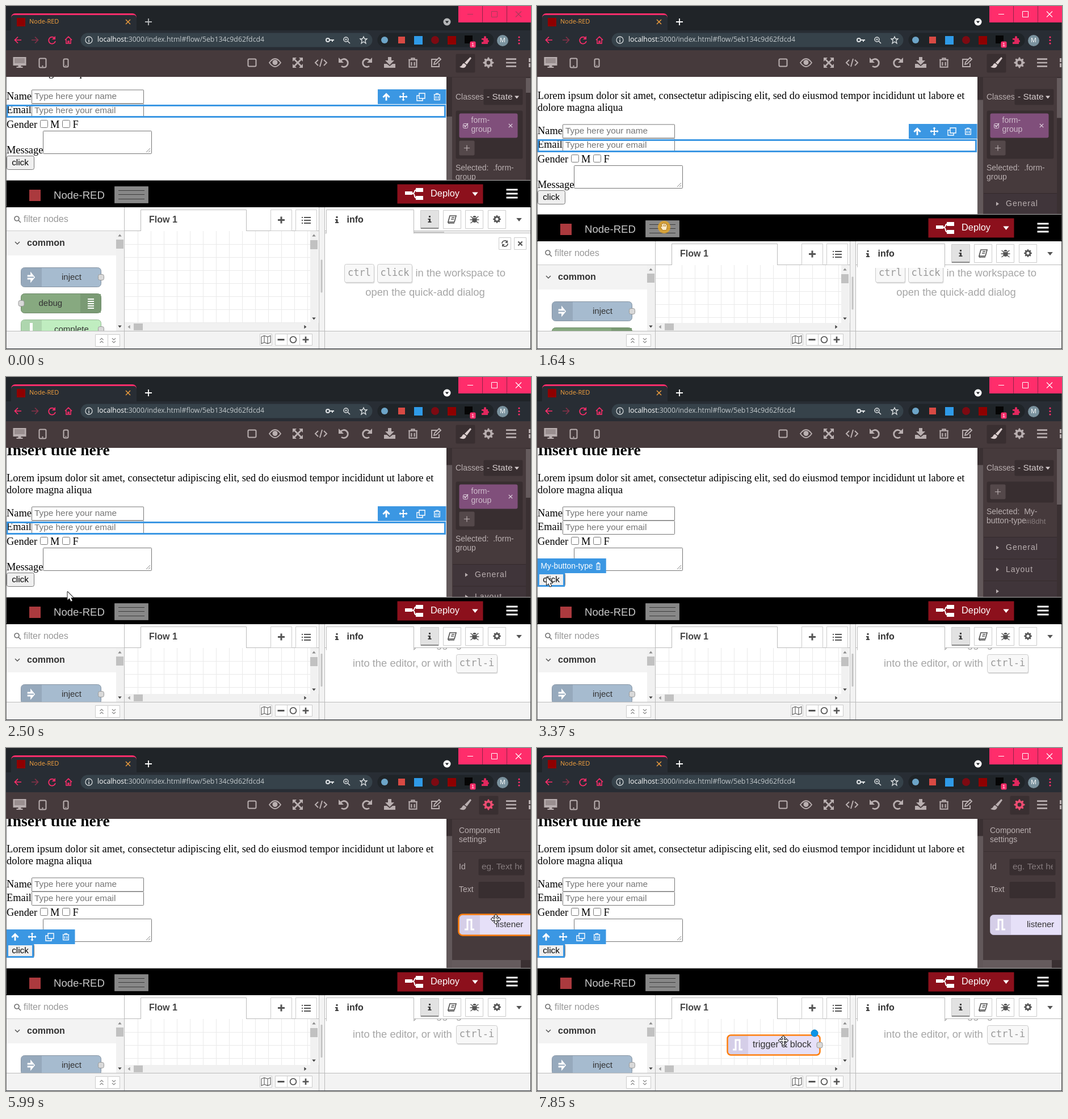
Animation of 925 by 605 pixels, one loop 8 s. Source, as an HTML page with a canvas:

```html
<!DOCTYPE html>
<html lang="en">
<head>
<meta charset="utf-8">
<title>Flow editor</title>
<style>
html, body { margin: 0; width: 100%; height: 100%; overflow: hidden; background: #fff; }
canvas { display: block; }
</style>
</head>
<body>
<canvas id="stage" width="925" height="605"></canvas>
<script>
const ctx = document.getElementById('stage').getContext('2d');
const SANS = '"Liberation Sans", Arial, sans-serif';
const SERIF = '"Liberation Serif", "Times New Roman", serif';
const MONO = '"DejaVu Sans Mono", monospace';
const UI = '"Open Sans", sans-serif';
const BLUE = '#3b97e3', PINK = '#ff2d6b', PANEL = '#463a3c', DARK = '#382e30', SOFT = '#b9afb0', ORANGE = '#ff7f0e';
const LOOP = 8000;

// Bursts of change: start, end, number of steps
const bursts = [[290, 470, 3], [610, 1190, 8], [1330, 2040, 10], [2190, 2830, 9], [3220, 3370, 3],
  [3620, 4320, 10], [4630, 5100, 7], [5370, 6140, 11], [6220, 6980, 11], [7060, 7850, 11]];
const mousePath = [[290, 742, 568], [380, 400, 450], [470, 42, 348], [610, 60, 350], [900, 160, 345],
  [1190, 229, 327], [1330, 229, 327], [1488, 227, 356], [1645, 224, 389], [1960, 219, 407], [2040, 217, 410],
  [2190, 200, 405], [2830, 17, 353], [3370, 17, 353], [3620, 60, 350], [4000, 600, 212], [4320, 885, 267],
  [4630, 885, 262], [5100, 864, 119], [5370, 850, 100], [5530, 850, 100], [5980, 863, 302], [6140, 863, 302],
  [6220, 845, 290], [6500, 600, 220], [6760, 480, 350], [6980, 410, 489], [7060, 412, 492], [7850, 434, 516]];
const splitPath = [[1330, 0], [1409, 10], [1488, 28], [1566, 46], [1645, 60.5], [1960, 78.5], [2040, 80], [2190, 81]];

function snap(t) {
  let s = 0;
  for (const [a, b, n] of bursts) {
    if (t < a) break;
    const k = Math.min(n - 1, Math.floor((t - a) * (n - 1) / (b - a) + 0.15));
    s = a + k * (b - a) / (n - 1);
  }
  return s;
}
function along(keys, t, i = 1) {
  if (t <= keys[0][0]) return keys[0][i];
  for (let k = 1; k < keys.length; k++) {
    const a = keys[k - 1], b = keys[k];
    if (t < b[0]) return a[i] + (b[i] - a[i]) * (t - a[0]) / (b[0] - a[0]);
  }
  return keys[keys.length - 1][i];
}

function rect(x, y, w, h, c) { ctx.fillStyle = c; ctx.fillRect(x, y, w, h); }
function box(x, y, w, h, fill, stroke, r = 0, lw = 1) {
  ctx.beginPath();
  ctx.roundRect(x + .5, y + .5, w - 1, h - 1, r);
  if (fill) { ctx.fillStyle = fill; ctx.fill(); }
  if (stroke) { ctx.strokeStyle = stroke; ctx.lineWidth = lw; ctx.stroke(); }
}
function disc(x, y, r, fill) {
  ctx.beginPath(); ctx.arc(x, y, r, 0, 7); ctx.fillStyle = fill; ctx.fill();
}
function text(s, x, y, size, color, { font = SANS, bold, align = 'left', gap = 0 } = {}) {
  ctx.font = `${bold ? 'bold ' : ''}${size}px ${font}`;
  ctx.textAlign = align;
  ctx.textBaseline = 'middle';
  ctx.letterSpacing = gap + 'px';
  ctx.fillStyle = color;
  ctx.fillText(s, x, y);
}
// Filled when w is 0, stroked otherwise
function icon(d, x, y, c, w = 0, sx = 1, sy = sx) {
  ctx.save();
  ctx.translate(x, y);
  ctx.scale(sx, sy);
  const p = new Path2D(d);
  if (w) { ctx.strokeStyle = c; ctx.lineWidth = w; ctx.stroke(p); }
  else { ctx.fillStyle = c; ctx.fill(p, 'evenodd'); }
  ctx.restore();
}
function clip(x, y, w, h, draw) {
  ctx.save();
  ctx.beginPath(); ctx.rect(x, y, w, h); ctx.clip();
  draw();
  ctx.restore();
}

const ring = 'M6 0A6 6 0 1 1-6 0A6 6 0 1 1 6 0';
const cross = 'M-4-4L4 4M4-4L-4 4', plus = 'M-6 0H6M0-6V6', down = 'M-4-2H4L0 3Z', up = 'M-4 2H4L0-3Z', right = 'M-2-4V4L3 0Z';
const turn = 'M-5-4A7 7 0 1 1-4 6', turnTip = 'M-9-9V0H0Z';
const bin = 'M-6-4H6M-2-4V-6H2V-4M-5-4V6H5V-4M-2-1V4M2-1V4';
const copy = 'M-3-6H7V3H-3ZM-3-2H-7V7H3V3';
const moveArrows = 'M0-8L3-5H1V-1H5V-3L8 0L5 3V1H1V5H3L0 8L-3 5H-1V1H-5V3L-8 0L-5-3V-1H-1V-5H-3Z';
const arrowUp = 'M0-7L7 0L5 2L1.5-1V7H-1.5V-1L-5 2L-7 0Z';
const pencil = 'M4-6H-7V7H6V1M-3 3L-2-1L6-9L9-6L1 2Z';
const lens = 'M3-1A4 4 0 1 1-5-1A4 4 0 1 1 3-1M2 2L6 6';
const bars = 'M-10-7H10M-10 0H10M-10 7H10';
const list = 'M-8-5H-6M-4-5H8M-8 0H-6M-4 0H8M-8 5H-6M-4 5H8';
const pulse = 'M-8 8H-3V-9H4V8H9';
const triangleSide = 'M-2-3.5V3.5L3 0Z';

function gear(x, y, r, c) {
  let d = '';
  for (let i = 0; i < 32; i++) {
    const a = (i - .5) * Math.PI / 16, q = i % 4 < 2 ? r : r * .75;
    d += (i ? 'L' : 'M') + q * Math.cos(a) + ' ' + q * Math.sin(a);
  }
  const h = r * .36;
  icon(`${d}ZM${h} 0A${h} ${h} 0 1 0 ${-h} 0A${h} ${h} 0 1 0 ${h} 0Z`, x, y, c);
}

function browser(active) {
  rect(0, 0, 925, 44, '#202428');
  ctx.beginPath(); ctx.roundRect(9, 13, 221, 32, [7, 7, 0, 0]); ctx.fillStyle = PINK; ctx.fill();
  ctx.beginPath(); ctx.roundRect(9, 16, 221, 29, [5, 5, 0, 0]); ctx.fillStyle = '#282d34'; ctx.fill();
  rect(0, 43, 925, 35, '#282d34');
  rect(19, 21, 15, 15, '#8f0000');
  text('Node-RED', 41, 28, 11, '#f5a13d', { font: UI });
  icon(cross, 215, 28, '#f5a13d', 1.4);
  const tone = active ? '#fff' : '#b4b6b8';
  icon(plus, 251, 28, tone, 1.8);
  disc(777, 28, 6.5, tone);
  icon(down, 777, 28, '#202428', 0, .8);
  rect(797, 0, 128, 29, PINK);
  rect(839, 0, 1, 29, '#8e2448');
  rect(882, 0, 1, 29, '#8e2448');
  const glyph = active ? '#fff' : '#a83a5a';
  icon('M-5 0H5', 818, 14.5, glyph, 1);
  box(855, 9, 11, 11, null, glyph);
  icon('M-5-5L5 5M5-5L-5 5', 903, 14.5, glyph, 1.1);

  const back = 'M6 0H-5M0-5.5L-5.5 0L0 5.5';
  icon(back, 21, 60, PINK, 1.7);
  icon(back, 51, 60, '#853249', 1.7, -1, 1);
  icon('M5-3A6 6 0 1 0 6 2', 81, 60, PINK, 1.7);
  icon('M1-1H7V-7Z', 80, 60, PINK);
  icon('M-6 0L0-6L6 0M-4-1V6H-1V2H1V6H4V-1', 110, 60, PINK, 1.5);
  box(131, 47, 515, 26, '#36424a', null, 13);
  icon(ring, 146, 60, '#d4d8da', 1.3);
  rect(145.3, 59, 1.5, 5, '#d4d8da');
  rect(145.3, 56, 1.5, 1.6, '#d4d8da');
  const host = { font: UI };
  text('localhost', 161, 60, 12.3, '#fff', host);
  const w = ctx.measureText('localhost').width;
  text(':3000/index.html#flow/5eb134c9d62fdcd4', 161 + w, 60, 12.3, '#c3c9cc', host);
  icon('M-1 0A3 3 0 1 1-7 0A3 3 0 1 1-1 0M-1 0H7M4 0V3', 571, 60, '#dfe3e5', 2);
  icon(lens, 600, 60, '#dfe3e5', 1.5);
  icon('M-3-1H1M-1-3V1', 600, 60, '#dfe3e5', 1);
  icon('M0-6L1.8-2H6L2.8 1L4 6L0 3L-4 6L-2.8 1L-6-2H-1.8Z', 630, 60, '#dfe3e5', 1.3);
  box(654, 47, 206, 26, '#1f2428', null, 13);
  disc(667, 60, 6, '#6da5c8');
  rect(691, 54, 12, 12, '#d84a44');
  rect(719, 53, 15, 15, '#2f9be8');
  disc(756, 60, 7, '#7d0a12');
  rect(778, 53, 15, 15, '#8f0000');
  rect(808, 52, 14, 14, '#050505');
  box(817, 62, 11, 12, PINK, null, 2);
  text('1', 822.5, 68.5, 9, '#fff', { align: 'center' });
  icon('M-6-3H-2V-5A2 2 0 1 1 2-5V-3H5V0A2 2 0 1 1 5 4V7H-6V3A2 2 0 1 0-6 0Z', 844, 60, '#e0285e');
  disc(875, 61, 10, '#7a929e');
  text('M', 875, 61, 11, '#fff', { font: UI, align: 'center' });
  for (const y of [55, 60.5, 66]) disc(904, y, 1.6, PINK);
}

function toolbar(settings) {
  rect(0, 78, 925, 47, PANEL);
  const c = SOFT;
  icon('M-11-10H12V5H-11ZM-2 5H3V7H6V9H-5V7H-2Z', 23.5, 100, c);
  rect(15, 92, 18, 9, '#9a8f90');
  box(58, 92, 13, 17, null, c, 2, 2); disc(64.5, 106, 1.2, c);
  box(101, 93, 9, 15, null, c, 2, 2); disc(105.5, 105, 1, c);
  box(426, 93, 15, 14, null, c, 2, 2);
  icon('M-10 0Q0-14 10 0Q0 14-10 0Z', 474, 100, c, 1.8);
  disc(474, 99.5, 4.5, c);
  icon('M-9-9H-2L-4.5-6.5L0-2L4.5-6.5L2-9H9V-2L6.5-4.5L2 0L6.5 4.5L9 2V9H2L4.5 6.5L0 2L-4.5 6.5L-2 9H-9V2L-6.5 4.5L-2 0L-6.5-4.5L-9-2Z', 514, 100, c);
  icon('M-5-5L-10 0L-5 5M5-5L10 0L5 5M2-7L-2 7', 555, 100, c, 2);
  for (const [x, s] of [[595, 1], [636, -1]]) {
    icon(turn, x, 100, c, 2.8, s, 1);
    icon(turnTip, x, 100, c, 0, s, 1);
  }
  icon('M-3-10H3V-4H8L0 4L-8-4H-3ZM-10 2H-5L0 6L5 2H10V9H-10Z', 676, 100, c);
  icon(bin, 717, 100, c, 1.6, 1.3);
  icon(pencil, 757, 100, c, 1.9);
  box(settings ? 833 : 792, 84, 35, 34, '#392f31', null, 2);
  icon('M9-10L11-8L3 3L-1 0ZM-2 1L2 4Q1 10-5 9Q-8 9-10 7Q-6 6-5 3Q-4 1-2 1Z', 809, 100, settings ? c : '#dccfcf');
  gear(850, 100, 9.5, settings ? '#ee4d72' : c);
  icon(bars, 890, 100, c, 3, .9);
  rect(921, 92, 4, 7, c); rect(921, 101, 4, 7, c);
}

function actions(x, y) {
  rect(x, y, 120.5, 26, BLUE);
  icon(arrowUp, x + 15, y + 13, '#fff', 0, .95);
  icon(moveArrows, x + 45, y + 13, '#fff', 0, .95);
  icon(copy, x + 76, y + 13, '#fff', 1.4);
  icon(bin, x + 104.5, y + 13, '#fff', 1.4, .95);
}

function page(st) {
  const serif = { font: SERIF };
  const line = (s, x, y) => text(s, x, y, 18.4, '#000', serif);
  const field = (y, hint) => {
    box(45, y, 198, 25, '#fff', '#767676', 1);
    text(hint, 50, y + 12.5, 15.36, '#757575');
  };
  clip(0, 125, 776, st.bottom - 125, () => {
    rect(0, 125, 776, 270, '#fff');
    ctx.save();
    ctx.translate(0, st.scroll);
    text('Insert title here', 1, 50, 27.6, '#000', { font: SERIF, bold: true });
    line('Lorem ipsum dolor sit amet, consectetur adipiscing elit, sed do eiusmod tempor incididunt ut labore et', 1, 98);
    line('dolore magna aliqua', 1, 119);
    line('Name', 1, 160);
    field(147.5, 'Type here your name');
    line('Email', 1, 184.5);
    field(172, 'Type here your email');
    line('Gender', 1, 210);
    box(60, 201, 14, 14, '#fff', '#767676', 2);
    line('M', 78, 210);
    box(99, 201, 14, 14, '#fff', '#767676', 2);
    line('F', 117.5, 210);
    line('Message', 1, 255);
    box(65, 220, 192, 41, '#fff', '#767676', 1);
    icon('M-7 0L0-7M-3 0L0-3', 254, 258, '#888', 1);
    box(1, 264, 49, 25, '#efefef', '#767676', 3);
    text('click', 25, 277, 15.3, '#000', { align: 'center' });
    ctx.strokeStyle = BLUE;
    ctx.lineWidth = 3;
    if (st.picked) {
      ctx.strokeRect(2.5, 265.5, 45, 22);
      actions(1, 239);
    } else {
      ctx.strokeRect(2, 175.5, 771.5, 20);
      actions(655, 147);
    }
    if (st.hover) {
      ctx.strokeStyle = BLUE;
      if (!st.picked) { ctx.lineWidth = 1; ctx.strokeRect(1.5, 264.5, 48, 24); }
      rect(1, 239, 120.5, 26, BLUE);
      text('My-button-type', 6.5, 253, 13.8, '#fff');
      icon(bin, 108, 252.5, '#fff', 1.5, .6, 1);
    }
    ctx.restore();
  });
  clip(776, 125, 10, st.bottom - 125, () => {
    rect(776, 125, 10, 270, '#3a3032');
    rect(776, 195 - st.d * .49, 10, 270, '#62585a');
  });
}

function sector(y, name) {
  rect(787, y - 19, 129, 38, '#40353a');
  rect(787, y - 19, 129, 1, '#342a2c');
  icon(triangleSide, 811, y, SOFT);
  text(name, 826, y + .5, 14, SOFT, { gap: 1 });
}

function stylePanel(st) {
  text('Classes', 792, 161, 14, SOFT);
  box(841, 146, 70, 29, DARK, null, 2);
  text('- State', 847, 161, 15.5, '#d5cccd');
  icon(down, 900, 160.5, '#d5cccd');
  const tagged = !st.picked, s = tagged ? 0 : -48;
  box(792, 184, 119, 86 + s, DARK, null, 3);
  if (tagged) {
    box(798, 189, 104, 44, '#804f7b', null, 3);
    box(805, 207, 9, 9, null, '#e0d2df', 2);
    icon('M-3-1L-1 2L4-4', 810, 211, '#e0d2df', 1.4);
    text('form-', 819.5, 202, 14, '#cdbccb');
    text('group', 819.5, 218.5, 14, '#cdbccb');
    icon(cross, 889, 211, '#e0d2df', 1.5, .8);
  }
  box(798, 237 + s, 28, 27, '#54484a', null, 2);
  icon(plus, 812, 250.5 + s, SOFT, 1.4, .85);
  text(tagged ? 'Selected:  .form-' : 'Selected:  My-', 792, 286.5 + s, 14, SOFT);
  text(tagged ? 'group' : 'button-type', 792, 302.5 + s, 14, SOFT);
  if (!tagged) text('#i8dht', 861, 255, 13, '#84797a');
  sector(349 + s, 'General');
  sector(387.5 + s, 'Layout');
  if (!tagged) sector(378, '');
  rect(916, 125, 9, 270, '#3a3032');
  rect(916, 127, 9, tagged ? 26 + st.d * .74 : 98, '#655b5d');
}

function paletteNode(x, y, w, h, fill, shade, edge) {
  box(x, y, w, h, fill, edge, 6);
  ctx.save();
  ctx.beginPath(); ctx.roundRect(x + 1, y + 1, w - 2, h - 2, 5); ctx.clip();
  rect(x, y, 37, h, shade);
  ctx.restore();
}
function port(x, y) { box(x - 5.5, y - 5.5, 11, 11, '#d9d9d9', '#999', 3); }

function listener(x, y) {
  paletteNode(x, y, 150, 36, '#e6e0f8', '#d5cee8', '#bcb4ce');
  icon(pulse, x + 18, y + 18, '#fff', 3);
  text('listener', x + 65, y + 18, 15, '#333');
}

function settingsPanel(st) {
  text('Component', 798, 146, 14, SOFT);
  text('settings', 798, 162.5, 14, SOFT);
  rect(787, 182, 138, 1, '#3a3032');
  for (const [name, y] of [['Id', 210], ['Text', 250.5]]) {
    text(name, 798, y, 14, SOFT);
    box(832, y - 15, 82, 30, DARK, null, 2);
  }
  clip(836, 195, 73, 30, () => text('eg. Text here', 838, 210, 15.4, '#857b7d'));
  listener(798, 294);
  if (st.over) box(797, 293, 152, 38, null, ORANGE, 7, 2.5);
  rect(786, 374, 139, 16, '#3a3032');
  rect(786, 374, 121, 14, '#655b5d');
}

function header(y) {
  rect(0, y - 1, 925, 1, '#aaa');
  rect(0, y, 925, 47, '#000');
  rect(41, y + 16, 20, 20, '#ab3a3e');
  text('Node-RED', 84, y + 27, 18.6, '#c7c7c7');
  box(191, y + 10, 60, 30, '#888', '#777');
  for (const k of [17, 24, 32]) rect(198, y + k, 46, 1, '#3c3c3c');
  box(689, y + 6, 152, 35, '#8c101c');
  rect(703, y + 19, 13, 6, '#fff');
  rect(722, y + 13, 13, 7, '#fff');
  rect(722, y + 27, 13, 7, '#fff');
  icon('M0 0C8 0 2-6 8-6M0 0C8 0 2 8 8 8', 715, y + 22.5, '#fff', 2);
  text('Deploy', 748, y + 23.5, 16.4, '#fff');
  icon(down, 826.5, y + 23, '#fff', 0, 1.3);
  icon(bars, 891.5, y + 23, '#fff', 3);
}

function tab(x, w, y) {
  box(x, y, w, 42, '#fff', '#bbb');
  rect(x + 1, y + 37, w - 2, 6, '#fff');
}
function button(x, y, w, h, fill = '#fff') { box(x, y, w, h, fill, '#ccc'); }
function scrollV(x, top, bottom, thumb) {
  rect(x, top, 14, bottom - top, '#f1f1f1');
  rect(x, thumb, 13, 16, '#c1c1c1');
  icon(up, x + 6.5, top + 8, '#8a8a8a', 0, .8);
  icon(down, x + 6.5, bottom - 8, '#444', 0, .8);
}

function palette(y) {
  clip(0, y, 209, 573 - y, () => {
    rect(0, y, 209, 260, '#fff');
    icon(lens, 20, y + 22, '#777', 1.7);
    text('filter nodes', 31, y + 22.5, 16.1, '#999');
    rect(0, y + 42, 209, 1, '#ccc');
    rect(0, y + 43, 194, 43, '#f3f3f3');
    icon('M-4-2L0 2L4-2', 20, y + 64, '#555', 1.5);
    text('common', 37, y + 65, 16, '#333', { bold: true });
    let n = y + 107;
    paletteNode(26, n, 142, 35, '#a6bbcf', '#96a9bc', '#8795a3');
    icon('M-7-4H-1V-10L8 0L-1 10V4H-7Z', 44, n + 17.5, '#fff', 0, .9, 1);
    icon('M-7 0H5', 44, n + 17.5, '#96a9bc', 2);
    text('inject', 98, n + 17.5, 15, '#333');
    port(167.5, n + 17.5);
    n += 46;
    box(26, n, 142, 35, '#87a980', '#6e8a69', 6);
    rect(131, n + 1, 36, 33, '#7a9a74');
    text('debug', 57.5, n + 17.5, 15, '#333');
    for (let k = 9; k < 28; k += 4) rect(144, n + k, 11, 2, '#fff');
    port(27, n + 17.5);
    n += 46;
    paletteNode(26, n, 142, 35, '#c0edc0', '#aed6ae', '#95b895');
    rect(42, n + 6, 5, 14, '#fff');
    text('complete', 85, n + 17.5, 15, '#333');
    port(167.5, n + 17.5);
    scrollV(194, y + 43, 573, y + 58);
    rect(208, y, 1, 230, '#bbb');
  });
}

function flowNode(x, y) {
  paletteNode(x, y, 164, 36, '#e6e0f8', '#d5cee8');
  icon(pulse, x + 18, y + 18, '#fff', 3);
  text('trigger & block', x + 45, y + 18, 16.2, '#333');
  box(x, y, 164, 36, null, ORANGE, 6, 2.5);
  port(x + 163, y + 18);
  disc(x + 154, y - 3, 6, '#0a95e8');
  ctx.strokeStyle = '#0a78bd'; ctx.lineWidth = 1; ctx.stroke();
}

function workspace(y, st) {
  const top = y + 43;
  rect(209, y, 343, 43, '#fff');
  rect(209, y + 42, 343, 1, '#bbb');
  tab(237, 187, y + 5);
  text('Flow 1', 252, y + 23.5, 16, '#444', { bold: true });
  button(466, y + 5, 38, 38);
  icon(plus, 485, y + 23.5, '#555', 3);
  button(510, y + 5, 38, 38);
  icon(list, 529, y + 24, '#555', 2);
  clip(209, top, 328, 559 - top, () => {
    rect(209, top, 328, 180, '#fff');
    for (let x = 232; x < 537; x += 23) rect(x, top, 1, 180, '#eaeaea');
    for (let g = top + 23; g < 559; g += 23) rect(209, g, 328, 1, '#eaeaea');
    if (st.t >= 7055) {
      const k = Math.min(1, (st.t - 7060) / 700);
      flowNode(313 + 22 * k, 484 + 22 * k);
    }
  });
  scrollV(536, top, 559, y + 59);
  rect(209, 559, 342, 14, '#f1f1f1');
  icon(right, 217, 566, '#999', 0, -.8, .8);
  icon(right, 527, 566, '#444', 0, .8);
  rect(225, 560, 16, 12, '#c1c1c1');
}

function keycap(s, x, y, w) {
  box(x + 1, y + 2, w, 33, '#ddd', null, 3);
  box(x, y, w, 33, '#f8f8f8', '#ccc', 3);
  text(s, x + w / 2, y + 16.5, 17, '#999', { font: MONO, align: 'center' });
}

function sidebar(y, st) {
  rect(551, y, 11, 260, '#f3f3f3');
  rect(551, y, 1, 260, '#bbb');
  rect(561, y, 1, 260, '#bbb');
  box(554, 447 + st.d / 2, 4, 59, '#c4c4c4', null, 1);
  rect(562, y, 363, 260, '#fff');
  if (st.d < 40) {
    rect(562, y + 44, 363, 4, '#e4e4e4');
    rect(715, y + 44, 57, 2, '#bbb');
    button(868, y + 54, 22, 22);
    icon('M4-3A5 5 0 0 0-5 0M-4 3A5 5 0 0 0 5 0', 879, y + 65, '#555', 1.7);
    icon('M5-6V-1H0ZM-5 6V1H0Z', 879, y + 65, '#555');
    button(895, y + 54, 22, 22);
    icon(cross, 906, y + 65, '#555', 2.4, .9);
  }
  clip(562, y + 43, 362, 530 - y, () => {
    rect(562, 435, 362, 138, '#fff');
    const c = '#a6a6a6', mid = { align: 'center' };
    if (st.t < 2500) {
      keycap('ctrl', 596, 455, 53);
      keycap('click', 654, 455, 62);
      text('in the workspace to', 721.5, 471.5, 18.4, c);
      text('open the quick-add dialog', 738.5, 506, 18.4, c, mid);
    } else {
      text('Import a flow by dragging its JSON', 738.5, 471.5, 18.4, c, mid);
      text('into the editor, or with', 611, 506, 18.4, c);
      keycap('ctrl-i', 793, 489, 73);
    }
  });
  rect(562, y, 363, 43, '#fff');
  rect(562, y + 42, 363, 1, '#bbb');
  tab(564, 155, y + 5);
  const info = 'M-3-1H1.5V4H3V6H-3V4H-1.5V1H-3ZM-1.5-6H1.5V-3H-1.5Z';
  icon(info, 583, y + 23, '#444');
  text('info', 600.5, y + 23.5, 16, '#333', { bold: true });
  button(730, y + 6, 33, 33, '#e2e2e2');
  rect(731, y + 37, 31, 2, '#888');
  icon(info, 746.5, y + 22, '#444');
  for (const x of [770, 809, 849]) button(x, y + 6, 32, 33);
  icon('M-4-6H7L4 5H-7ZM-7 5Q-7 8-4 7H4M-1-3H4M-2 0H3', 786, y + 22, '#555', 1.7);
  icon('M-3-3A3 3 0 0 1 3-3ZM-4-2H4V4Q0 8-4 4Z', 825.5, y + 22, '#555');
  icon('M-7-5L-3-2M-8 1H8M-7 7L-3 4M7-5L3-2M7 7L3 4', 825.5, y + 22, '#555', 1.4);
  gear(865, y + 22, 7, '#555');
  icon(down, 904, y + 22.5, '#555', 0, 1.2);
}

function footer() {
  rect(0, 573, 925, 32, '#f3f3f3');
  rect(0, 573, 925, 1, '#bbb');
  for (const x of [208, 551, 561]) rect(x, 573, 1, 32, '#bbb');
  button(157, 579, 23, 22);
  button(179, 579, 22, 22);
  const chevrons = 'M-3-1L0-4L3-1M-3 4L0 1L3 4';
  icon(chevrons, 168.5, 590, '#888', 1.2);
  icon(chevrons, 190, 590, '#888', 1.2, 1, -1);
  button(447, 578, 22, 21);
  icon('M-8-5L-3-7L3-5L8-7V5L3 7L-3 5L-8 7ZM-3-7V5M3-5V7', 458, 588.5, '#666', 1.2);
  for (const x of [474, 495, 517]) button(x, 578, 23, 21);
  icon('M-6 0H6', 484.5, 588.5, '#555', 3);
  icon(ring, 506, 588.5, '#555', 2, .9);
  icon('M-6 0H6M0-6V6', 528, 588.5, '#555', 3, .9);
}

function pointer(kind, x, y, pressed) {
  const edge = pressed ? '#a87416' : '#222';
  const outlined = (d, scale = 1) => {
    ctx.lineJoin = 'round';
    icon(d, x, y, edge, 2, scale);
    icon(d, x, y, pressed ? '#fdeccb' : '#fff', 0, scale);
  };
  if (kind === 'hand') {
    outlined('M-3 7L-7 1Q-6-1-4 1L-5-5Q-3-7-2-4L-2-6Q0-8 1-5L2-6Q4-7 4-4Q6-5 6-2L5 4L4 7Z', .85);
    icon('M-2-4L-1 0M1-5V0M4-4L3 0', x, y, edge, 1, .85);
  } else if (kind === 'move') outlined(moveArrows);
  else outlined('M0 0V14L3.3 11L6 16.5L8.2 15.5L5.7 10.2H10Z');
  ctx.lineJoin = 'miter';
}

function draw(now) {
  const t = snap(now % LOOP);
  const split = along(splitPath, t);
  const d = Math.floor(split);
  const x = along(mousePath, t), y = along(mousePath, t, 2);
  const dragging = t >= 6215 && t < 7055;
  const settings = t >= 5510;
  const st = {
    t, d, scroll: Math.ceil(split), bottom: 308 + d,
    picked: t >= 3215,
    hover: t >= 2700 && t < 3615,
    over: t >= 5900 && t < 6215
  };

  rect(0, 0, 925, 605, '#fff');
  browser(t >= 1325);
  toolbar(settings);
  page(st);
  clip(786, 125, 139, st.bottom - 125, () => {
    rect(786, 125, 139, 270, PANEL);
    rect(786, 125, 139, 1, '#3d3234');
    (settings ? settingsPanel : stylePanel)(st);
  });
  header(st.bottom);
  const top = st.bottom + 46;
  palette(top);
  workspace(top, st);
  sidebar(top, st);
  footer();
  rect(0, 125, 1, 480, '#777');
  rect(924, 29, 1, 576, '#4a4a4a');
  rect(0, top, 925, 1, '#000');
  rect(0, 604, 925, 1, '#3c4046');

  if (dragging) {
    ctx.globalAlpha = .65;
    clip(x - 66, y - 9, 128, 38, () => listener(x - 66, y - 9));
    ctx.globalAlpha = 1;
  }
  const pressed = (t >= 1325 && t < 2185) || (t >= 3215 && t < 3360) || (t >= 5370 && t < 5520);
  if (pressed) {
    ctx.globalAlpha = .85;
    disc(x, y + 1, 11, '#e3a62c');
    ctx.globalAlpha = 1;
  }
  if (t >= 285) {
    const onHandle = t < 2185 && x > 191 && x < 251;
    pointer(onHandle ? 'hand' : st.over || t >= 6215 ? 'move' : 'arrow', x, y, pressed);
  }
}

const start = performance.now();
function tick() {
  draw(performance.now() - start);
  requestAnimationFrame(tick);
}
tick();
</script>
</body>
</html>
```
